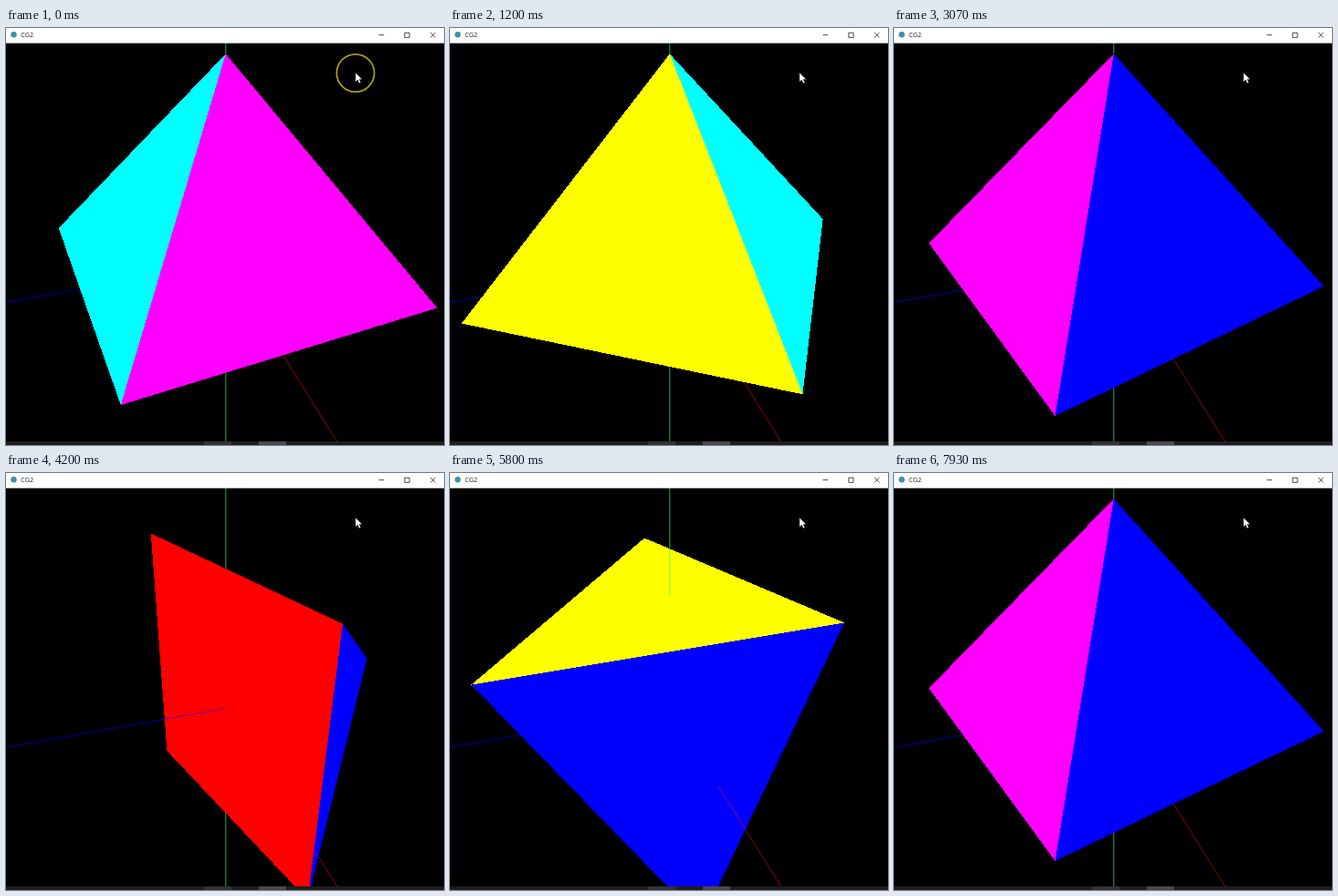
Animation of 480 by 458 pixels, one loop 8 s. Source, as an HTML page:

```html
<!DOCTYPE html>
<html lang="en">
<head>
<meta charset="utf-8">
<title>CG2</title>
<style>
  html, body { margin: 0; width: 100%; height: 100%; overflow: hidden; background: #000; }
  svg { display: block; width: 480px; height: 458px; }
  .axis { fill: none; stroke-width: 1.1; }
  text { font: 7.2px "Open Sans", "Noto Sans", sans-serif; fill: #222; }
</style>
</head>
<body>
<svg viewBox="0 0 480 458">
  <rect width="480" height="458" fill="#000"/>
  <g id="back"></g>
  <g id="solid" shape-rendering="crispEdges"></g>
  <g id="front"></g>
  <circle id="ring" cx="383" cy="49.5" r="20.6" fill="none" stroke="#a89c10" stroke-width="1.8"/>
  <path d="M383 49v10.2l2.4-2.1 1.6 3.7 1.8-.8-1.6-3.5h3.1z" fill="#fff" stroke="#222" stroke-width=".5"/>
  <g>
    <rect width="480" height="16.7" fill="#fff"/>
    <circle cx="8.5" cy="7.3" r="3.2" fill="#3f8f9f"/>
    <text x="16.3" y="10.2">CG2</text>
    <path d="M408.7 7.7h5.5M436.9 5.2h5.2v5.2h-5.2zM465.2 5l5.4 5.4M470.6 5l-5.4 5.4" fill="none" stroke="#333" stroke-width=".9"/>
  </g>
  <rect y="454" width="480" height="4" fill="#1e1e1e"/>
  <rect x="217" y="454" width="30" height="4" fill="#333"/>
  <rect x="277" y="454" width="30" height="4" fill="#4c4844"/>
</svg>
<script>
const LOOP = 8000, FRAME = 1000 / 15, REPEAT = 30.55;
const CX = 240.8, CY = 258.5, FOCAL = 582;
const EYE = [3, 2, 1];

const dot = (a, b) => a[0] * b[0] + a[1] * b[1] + a[2] * b[2];
const sub = (a, b) => a.map((v, i) => v - b[i]);
const scale = (a, k) => a.map(v => v * k);
const cross = (a, b) => [
  a[1] * b[2] - a[2] * b[1], a[2] * b[0] - a[0] * b[2], a[0] * b[1] - a[1] * b[0]
];
const unit = a => scale(a, 1 / Math.hypot(...a));

// Camera looking at the world's centre
const toward = unit(EYE);
const right = unit(cross([0, 1, 0], toward));
const up = cross(toward, right);
const dist = Math.hypot(...EYE);

function project(p) {
  const k = FOCAL / (dist - dot(p, toward));
  return (CX + dot(p, right) * k).toFixed(2) + "," + (CY - dot(p, up) * k).toFixed(2);
}

// Pyramid: apex first, then the base corners
const points = [[0, 1.4, 0], [1, 0, 1], [1, 0, -1], [-1, 0, -1], [-1, 0, 1]];
const faces = [
  { ids: [0, 1, 2], color: "#f0f" },
  { ids: [0, 2, 3], color: "#00f" },
  { ids: [0, 3, 4], color: "#ff0" },
  { ids: [0, 4, 1], color: "#0ff" },
  { ids: [4, 3, 2, 1], color: "#f00" }
];
const axes = [
  { dir: [1, 0, 0], length: 2.5, color: "#f01020", opacity: .45 },
  { dir: [0, 0, 1], length: 3, color: "#00f", opacity: .55 },
  { dir: [0, 1, 0], length: 3, color: "#3f8", opacity: .62 },
  { dir: [0, -1, 0], length: 3, color: "#3f8", opacity: .62 }
];

function add(parent, tag, attrs) {
  const el = document.createElementNS("http://www.w3.org/2000/svg", tag);
  for (const name in attrs) el.setAttribute(name, attrs[name]);
  return document.getElementById(parent).appendChild(el);
}
for (const f of faces) f.el = add("solid", "polygon", { fill: f.color });
for (const a of axes) {
  const look = { class: "axis", stroke: a.color, "stroke-opacity": a.opacity };
  a.back = add("back", "path", look);
  a.front = add("front", "path", look);
}
const ring = document.getElementById("ring");

// Number of key presses since start, one per gap, at most max
const presses = (t, start, gap, max) =>
  Math.max(0, Math.min(max, Math.floor((t - start) / gap) + 1));

const yaw = t => 5 + 5 * presses(t, 350, REPEAT, 56);
const roll = t => 5 * (
  presses(t, 3200, 1, 1) + presses(t, 3707, REPEAT, 56) + presses(t, 5540, 140, 15)
);

function rotate([x, y, z], a, b) {
  const ca = Math.cos(a), sa = Math.sin(a), cb = Math.cos(b), sb = Math.sin(b);
  const rx = x * cb - y * sb, ry = x * sb + y * cb;
  return [rx * ca + z * sa, ry, z * ca - rx * sa];
}

const line = (p, q) => "M" + project(p) + "L" + project(q);

function draw(time) {
  const t = Math.floor((time % LOOP + 5) / FRAME) * FRAME;
  const rad = Math.PI / 180;
  const world = points.map(p => rotate(p, yaw(t) * rad, roll(t) * rad));

  for (const f of faces) {
    const c = f.ids.map(i => world[i]);
    f.normal = unit(cross(sub(c[1], c[0]), sub(c[2], c[0])));
    f.offset = dot(f.normal, c[0]);
    f.seen = dot(f.normal, EYE) > f.offset + 1e-6;
    f.el.setAttribute("points", c.map(project).join(" "));
    f.el.setAttribute("visibility", f.seen ? "visible" : "hidden");
  }

  // An axis leaving through a visible face continues in front of the solid
  for (const a of axes) {
    let exit = Infinity, seen = false;
    for (const f of faces) {
      const slope = dot(f.normal, a.dir);
      if (slope < 1e-6) continue;
      const s = f.offset / slope;
      if (s < exit) { exit = s; seen = f.seen; }
    }
    const tip = scale(a.dir, a.length);
    const onTop = seen && exit < a.length;
    a.back.setAttribute("d", onTop ? "" : line([0, 0, 0], tip));
    a.front.setAttribute("d", onTop ? line(scale(a.dir, exit), tip) : "");
  }
  ring.setAttribute("visibility", t < 190 ? "visible" : "hidden");
}

const begin = performance.now();
function tick() {
  draw(performance.now() - begin);
  requestAnimationFrame(tick);
}
draw(0);
requestAnimationFrame(tick);
</script>
</body>
</html>
```
